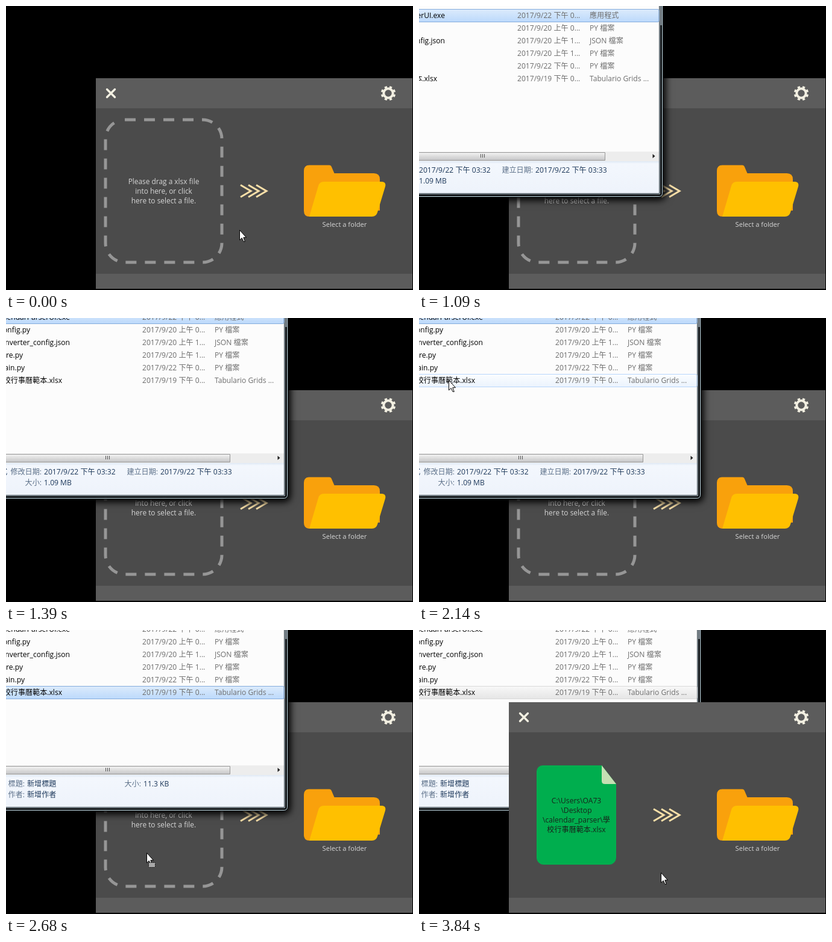
These frames come from a looping animation (675x472 px, 4920 ms). An HTML page:

```html
<!DOCTYPE html>
<html lang="zh-Hant">
<head>
<meta charset="utf-8">
<style>
html, body { margin: 0; width: 100%; height: 100%; overflow: hidden; background: #000; }
svg { display: block; width: 675px; height: 472px; }
text { font: 12.1px "Open Sans", "Noto Sans CJK TC", "Noto Sans CJK", sans-serif; white-space: pre; }
.mid { text-anchor: middle; }
.end { text-anchor: end; }
.hint { font-size: 11.9px; fill: #d6d6d6; }
.col { fill: #6d6d6d; }
.key { fill: #5b6f88; }
.val { fill: #1e395b; }
.row { fill: none; }
.row.hover { fill: url(#hover); stroke: #b8d6fb; }
.row.sel { fill: url(#sel); stroke: #84acdd; }
.row.dim { fill: url(#dim); stroke: #d9d9d9; }
#win.front { filter: drop-shadow(2px 3px 6px #000) drop-shadow(1px 1px 4px #0009); }
</style>
</head>
<body>
<svg viewBox="0 0 675 472">
  <defs>
    <linearGradient id="hover" x2="0" y2="1"><stop stop-color="#fbfdff"/><stop offset="1" stop-color="#ebf3fd"/></linearGradient>
    <linearGradient id="sel" x2="0" y2="1"><stop stop-color="#dcebfc"/><stop offset="1" stop-color="#bcd9fb"/></linearGradient>
    <linearGradient id="dim" x2="0" y2="1"><stop stop-color="#f8f8f8"/><stop offset="1" stop-color="#e5e5e5"/></linearGradient>
    <linearGradient id="bar" x2="0" y2="1"><stop stop-color="#f4f4f4"/><stop offset=".5" stop-color="#dcdcdc"/><stop offset="1" stop-color="#c6c6c8"/></linearGradient>
    <linearGradient id="pane" x2="0" y2="1"><stop stop-color="#dfe9f5"/><stop offset=".08" stop-color="#f3f7fd"/><stop offset="1" stop-color="#eef3fb"/></linearGradient>
  </defs>
  <rect width="675" height="472"/>
  <g id="stack">
    <g id="app">
      <path d="M149 120H674V470H149Z" fill="#5c5c5c"/>
      <path d="M149 170H674V445H149Z" fill="#4b4b4b"/>
      <path d="M167.500 138.500l13 13m0-13l-13 13" stroke="#f3f0e2" stroke-width="3.400" stroke-linecap="round"/>
      <g fill="none" stroke="#f3f0e2" transform="translate(634 145)">
        <circle r="7.700" stroke-width="4"/>
        <circle r="10.600" stroke-width="3.400" pathLength="80" stroke-dasharray="5" stroke-dashoffset="-2.500"/>
      </g>
      <g id="drop">
        <path d="M197 189H326A32 32 0 0 1 358 221V394A32 32 0 0 1 326 426H197A32 32 0 0 1 165 394V221A32 32 0 0 1 192 189.400"
          fill="none" stroke="#969696" stroke-width="5" stroke-dasharray="18 14"/>
        <g class="mid">
          <text class="hint" x="261.500" y="296">Please drag a xlsx file</text>
          <text class="hint" x="261.500" y="312">into here, or click</text>
          <text class="hint" x="261.500" y="328">here to select a file.</text>
        </g>
      </g>
      <g id="file">
        <path d="M205 225H303L327 256V378a12 12 0 0 1-12 12H207a12 12 0 0 1-12-12V235a10 10 0 0 1 10-10Z" fill="#00ae4e"/>
        <path d="M303 225V251q0 5 5 5H327Z" fill="#c5dfb3"/>
        <g class="mid" fill="#17251c">
          <text x="261" y="288">C:\Users\OA73</text>
          <text x="261" y="304">\Desktop</text>
          <text x="261" y="320">\calendar_parser\學</text>
          <text x="261" y="336">校行事曆範本.xlsx</text>
        </g>
      </g>
      <path d="M389 297.500l17 10-17 10m13-20l17 10-17 10m13-20l17 10-17 10" fill="none" stroke="#f8dfa8" stroke-width="3"/>
      <path d="M503 264.500H536q3 0 4 3l4.500 10.500H610q10 0 10 10V340H510V350H503.500q-9.500 0-9.500-9.500V274q0-9.500 9-9.500Z" fill="#f9a10c"/>
      <path d="M527 292H622q9 0 7 8L616 343q-2 7-9 7H503L518 299q2-7 9-7Z" fill="#ffc000"/>
      <text class="hint mid" x="561.500" y="367" style="font-size:11.2px">Select a folder</text>
    </g>
    <g id="win">
      <rect x="-400" y="-200" width="867.500" height="500.500" rx="6" fill="#14181c" fill-opacity=".72" stroke="#15191d"/>
      <rect x="-399" y="-199" width="865.500" height="498.500" rx="5" fill="none" stroke="#bcd3da"/>
      <path d="M463 -100h4V15h-4Z" fill="#becdd7" fill-opacity=".5"/>
      <path d="M-399 -100H462.500V295.500H-399Z" fill="none" stroke="#9aa8b0"/>
      <path d="M-399 -100H461.500V294.500H-399Z" fill="#fcfcfc" stroke="#4a5258"/>
      <g id="rows"></g>
      <path d="M-399 225H461V241H-399Z" fill="#ededed"/>
      <path d="M-399 226.500H371.500V239.500H-399Z" fill="url(#bar)" stroke="#979797"/>
      <path d="M165.500 229v6m3-6v6m3-6v6" stroke="#555"/>
      <path d="M450.500 229l4 3.500-4 3.500Z" fill="#222"/>
      <path d="M-399 241H461V294H-399Z" fill="url(#pane)"/>
      <g id="exeInfo"></g>
      <g id="xlsxInfo"></g>
    </g>
  </g>
  <g id="cursor">
    <path d="M.5 -.5V16L4.200 12.500 7 18.500h2.300L6.800 11.700H11.500Z" fill="#fff" stroke="#000"/>
    <rect id="badge" x="3.500" y="15.500" width="11" height="8" rx="1" fill="#a8a8a8" stroke="#111" stroke-dasharray="2 1"/>
  </g>
</svg>
<script>
const $ = id => document.getElementById(id);
const LOOP = 4920, SELECT = 2300, DRAG = 2380, DROP = 3000, RAISE = 3530;

const label = (x, y, cls, s) => `<text x="${x}" y="${y}" class="${cls}">${s}</text>`;

// name, right edge of name, date, type
const files = [
  ['calendarParserUI.exe', 106, '2017/9/22 下午 0...', '應用程式'],
  ['config.py', 40, '2017/9/20 上午 0...', 'PY 檔案'],
  ['converter_config.json', 106, '2017/9/20 上午 1...', 'JSON 檔案'],
  ['core.py', 28, '2017/9/20 上午 1...', 'PY 檔案'],
  ['main.py', 31, '2017/9/22 下午 0...', 'PY 檔案'],
  ['學校行事曆範本.xlsx', 93, '2017/9/19 下午 0...', 'Tabulario Grids ...']
];
$('rows').innerHTML = files.map(([name, right, date, type], i) => {
  const y = 21 * i + 3;
  return `<rect class="row" x="-390" y="${y - 14.5}" width="851" height="21" rx="2"/>` +
    label(right, y, 'end', name) + label(226, y, 'col', date) + label(346, y, 'col', type);
}).join('');

const info = list => list.map(([x, y, key, val]) =>
  label(x - 4, y, 'key end', key) + label(x, y, 'val', val)).join('');
$('exeInfo').innerHTML = label(2, 260, 'val end', '應用程式') + info([
  [63, 260, '修改日期:', '2017/9/22 下午 03:32'],
  [256, 260, '建立日期:', '2017/9/22 下午 03:33'],
  [63, 278, '大小:', '1.09 MB']
]);
$('xlsxInfo').innerHTML = info([
  [35, 260, '標題:', '新增標題'],
  [228, 260, '大小:', '11.3 KB'],
  [35, 278, '作者:', '新增作者']
]);

// Stepped paths: time, x, y
const AWAY = -900;
const winPath = [
  [0, AWAY, 0], [930, -412, -33], [1010, -225, 2], [1090, -63, 17],
  [1160, -22, 13], [1240, -6, 7], [1310, -1, 2], [1390, 0, 0]
];
const cursorPath = [
  [0, 387, 373], [220, 240, 270], [300, AWAY, 0],
  [1850, 92, 4], [1930, 76, 40], [2000, 62, 72], [2080, 53, 95], [2140, 49, 104],
  [DRAG, 58, 112], [2460, 98, 172], [2530, 158, 262], [2600, 210, 338], [2680, 233, 371],
  [3150, 235, 368], [3220, 238, 364], [3300, 241, 361],
  [3610, 285, 374], [3690, 342, 389], [3760, 386, 400], [3840, 401, 404]
];
const at = (path, t) => path.findLast(p => p[0] <= t).slice(1);
const place = (el, [x, y]) => el.setAttribute('transform', `translate(${x} ${y})`);
const show = (id, on) => $(id).style.display = on ? '' : 'none';
const rows = document.querySelectorAll('.row');

function draw(t) {
  const pos = at(cursorPath, t), picked = t >= SELECT, raised = t >= RAISE;
  const chosen = picked ? 5 : 0;
  const hovered = t >= 1850 && !picked ? Math.floor((pos[1] + 12) / 21) : -1;
  place($('win'), at(winPath, t));
  place($('cursor'), pos);
  rows.forEach((r, i) => r.setAttribute('class', 'row ' +
    (i === chosen ? (raised ? 'dim' : 'sel') : i === hovered ? 'hover' : '')));
  show('exeInfo', !picked);
  show('xlsxInfo', picked);
  show('badge', t >= DRAG && t < DROP);
  show('drop', t < DROP);
  show('file', t >= DROP);
  $('win').setAttribute('class', raised ? '' : 'front');
  const top = raised ? $('app') : $('win');
  if ($('stack').lastElementChild !== top) $('stack').append(top);
}

const start = performance.now();
function tick() {
  draw((performance.now() - start) % LOOP);
  requestAnimationFrame(tick);
}
tick();
</script>
</body>
</html>
```
